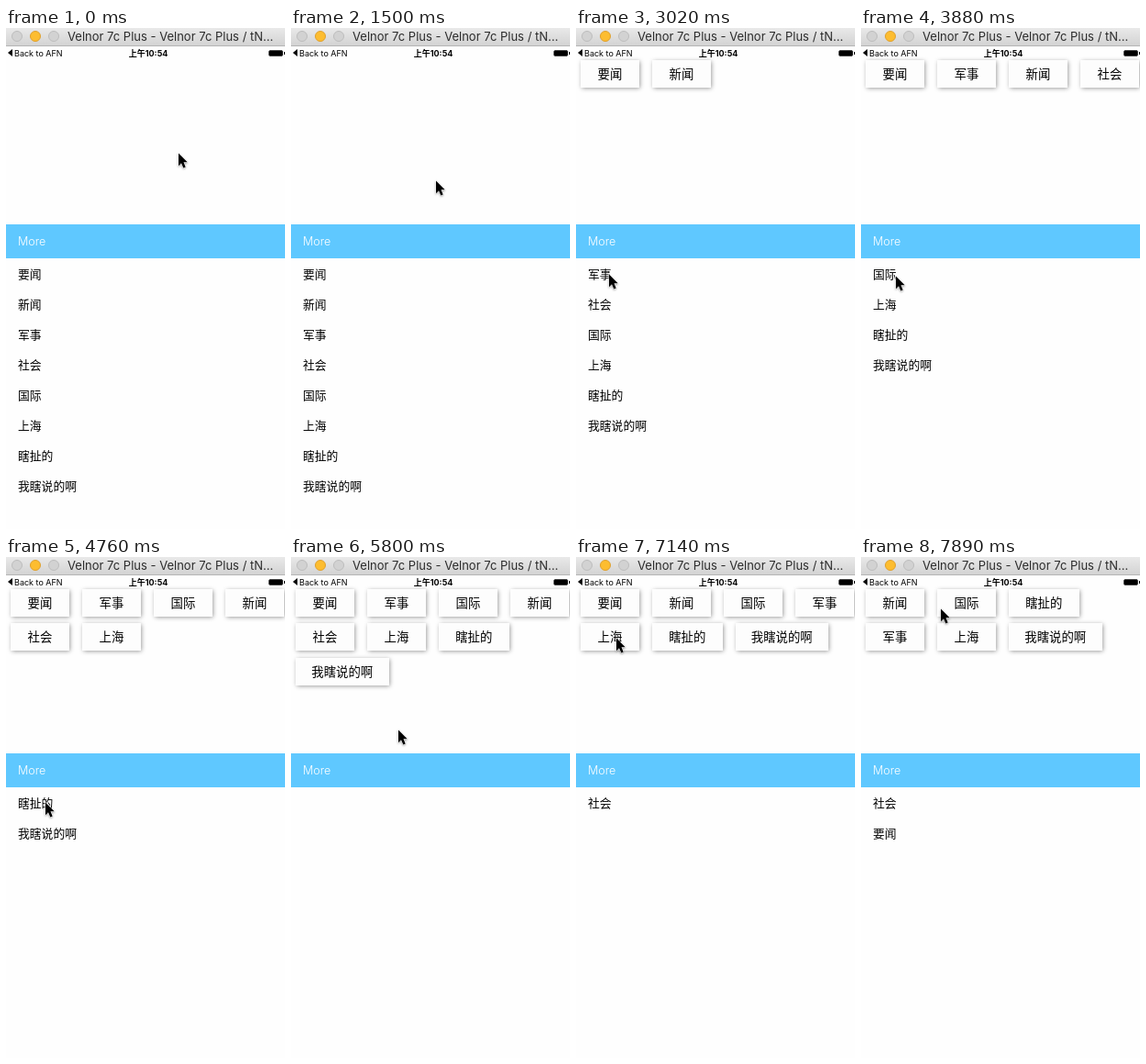
These frames come from a looping animation (304 px wide and 546 px high, 8 s). An HTML page:

```html
<!DOCTYPE html>
<html lang="zh-CN">
<head>
<meta charset="utf-8">
<title>Tag picker</title>
<style>
  html, body { margin: 0; width: 100%; height: 100%; overflow: hidden; background: #fff; }
  #stage {
    position: relative; width: 304px; height: 546px; overflow: hidden; background: #fefefe;
    font-family: Inter, "Noto Sans CJK SC", "Noto Sans CJK", sans-serif; color: #000;
  }
  #stage div, #stage svg { position: absolute; white-space: nowrap; box-sizing: border-box; }
  #title {
    left: 0; top: 0; width: 304px; height: 20px;
    background: linear-gradient(#e9e9e9, #d3d3d3); border-bottom: 1px solid #b5b5b5;
  }
  #title span { position: absolute; left: 67px; top: 0; font-size: 13px; line-height: 19px; color: #2c2c2c; }
  .light { top: 3px; width: 12px; height: 12px; border-radius: 50%; background: #d2d2d2; border: 1px solid #bdbdbd; }
  .light.on { background: #fdbd30; border-color: #e0a02c; }
  .status { top: 21px; font-size: 9px; line-height: 13px; }
  #back { left: 9px; }
  #clock { left: 105px; width: 100px; text-align: center; font-weight: 700; }
  #arrow { left: 2px; top: 23px; border: solid transparent; border-width: 4.5px 5px 4.5px 0; border-right-color: #000; }
  #battery { left: 286px; top: 24px; width: 16px; height: 7px; background: #000; border: 1px solid #444; border-radius: 2px; }
  #nub { left: 302.6px; top: 26px; width: 1.4px; height: 3px; background: #000; }
  #more {
    left: 0; top: 214px; width: 304px; height: 37px; padding-left: 13px;
    background: #5fc8ff; color: #fff; font-size: 12.6px; font-weight: 300; line-height: 38px;
  }
  #press { left: 0; top: 251px; width: 304px; height: 33px; background: #d9d9d9; }
  .row { left: 13px; height: 33px; font-size: 12.8px; line-height: 33px; }
  .tag {
    height: 30px; text-align: center; font-size: 13.4px; line-height: 30px;
    background: #fdfdfd; box-shadow: .5px .5px 5px rgba(0, 0, 0, .45);
  }
  #cursor { left: 0; top: 0; overflow: visible; filter: drop-shadow(0 1px 1px rgba(0, 0, 0, .35)); }
</style>
</head>
<body>
<div id="stage">
  <div id="title">
    <div class="light" style="left:6px"></div>
    <div class="light on" style="left:26px"></div>
    <div class="light" style="left:46px"></div>
    <span>Velnor 7c Plus - Velnor 7c Plus / tN...</span>
  </div>
  <div id="arrow"></div>
  <div id="back" class="status">Back to AFN</div>
  <div id="clock" class="status">上午10:54</div>
  <div id="battery"></div><div id="nub"></div>
  <div id="tags"></div>
  <div id="more">More</div>
  <div id="press"></div>
  <div id="list"></div>
  <svg id="cursor" width="12" height="18">
    <path d="M1 .5V14.2L4 11.2L6.3 16.4L8.7 15.4L6.5 10.3H10.7Z" stroke="#fff" paint-order="stroke"/>
  </svg>
</div>
<script>
const LOOP = 8000, STEP = 30;
const $ = id => document.getElementById(id);
const words = s => s.split(' ');

const topics = words('要闻 新闻 军事 社会 国际 上海 瞎扯的 我瞎说的啊');

// each pick moves the first row into a tag slot; lit rows flash just before
const picks = [
  { at: 2040, slot: 0 }, { at: 2660, slot: 1, lit: true },
  { at: 3170, slot: 1 }, { at: 3650, slot: 3, lit: true },
  { at: 4110, slot: 2, lit: true }, { at: 4580, slot: 5, lit: true },
  { at: 5030, slot: 6 }, { at: 5470, slot: 7 }
];

// each drop sends a tag back to the list and reshuffles the others
const drops = [
  { at: 6960, name: '社会', order: '要闻 新闻 国际 军事 上海 瞎扯的 我瞎说的啊' },
  { at: 7430, name: '要闻', order: '新闻 国际 瞎扯的 军事 上海 我瞎说的啊' }
];

// pointer moves, bent towards an optional control point
const home = [187, 136];
const moves = [
  { from: 1380, to: 1940, end: [47, 273] },
  { from: 2310, to: 2480, end: [41, 269] },
  { from: 2840, to: 3020, end: [35, 268] },
  { from: 3380, to: 3560, end: [37, 270] },
  { from: 4140, to: 4400, end: [42, 267] },
  { from: 5740, to: 6330, end: [59, 84], via: [440, -150] },
  { from: 6330, to: 6520, end: [74, 113], via: [-8, 104] },
  { from: 6520, to: 6660, end: [43, 88] },
  { from: 7140, to: 7350, end: [42, 54] },
  { from: 7760, to: 7890, end: [86, 56], via: [66, 61] }
];

function stateAt(t) {
  const list = [...topics];
  let tags = [];
  for (const p of picks) if (t >= p.at) tags.splice(p.slot, 0, list.shift());
  for (const d of drops) if (t >= d.at) {
    list.push(d.name);
    tags = words(d.order);
  }
  return { tags, list };
}

function pointerAt(t) {
  let pos = home;
  for (const { from, to, end, via } of moves) {
    if (t < from) break;
    const k = Math.min(1, (t - from) / (to - from));
    const start = pos;
    pos = end.map((e, i) => {
      const mid = via ? via[i] : (start[i] + e) / 2;
      return (1 - k) ** 2 * start[i] + 2 * k * (1 - k) * mid + k * k * e;
    });
  }
  return pos.map(Math.round);
}

function add(parent, cls, text, css) {
  const el = document.createElement('div');
  el.className = cls;
  el.textContent = text;
  Object.assign(el.style, css);
  parent.append(el);
}

function flowTags(names) {
  const box = $('tags');
  box.replaceChildren();
  let x = 5, y = 35;
  for (const name of names) {
    const w = 39 + 12.5 * name.length;
    if (x + w > 304) { x = 5; y += 37.3; }
    add(box, 'tag', name, { left: x + 'px', top: Math.round(y) + 'px', width: w + 'px' });
    x += w + 14;
  }
}

function fillList(names) {
  const box = $('list');
  box.replaceChildren();
  names.forEach((name, i) => add(box, 'row', name, { top: 251.5 + 33 * i + 'px' }));
}

let shown = '';
function draw(t) {
  const { tags, list } = stateAt(t);
  const key = tags.join() + '|' + list.join();
  if (key !== shown) {
    shown = key;
    flowTags(tags);
    fillList(list);
  }
  const lit = picks.some(p => p.lit && t >= p.at - STEP && t < p.at);
  $('press').style.display = lit ? '' : 'none';
  const [x, y] = pointerAt(t);
  $('cursor').style.transform = `translate(${x}px, ${y}px)`;
}

const start = performance.now();
function tick() {
  draw((performance.now() - start) % LOOP);
  requestAnimationFrame(tick);
}
tick();
</script>
</body>
</html>
```
